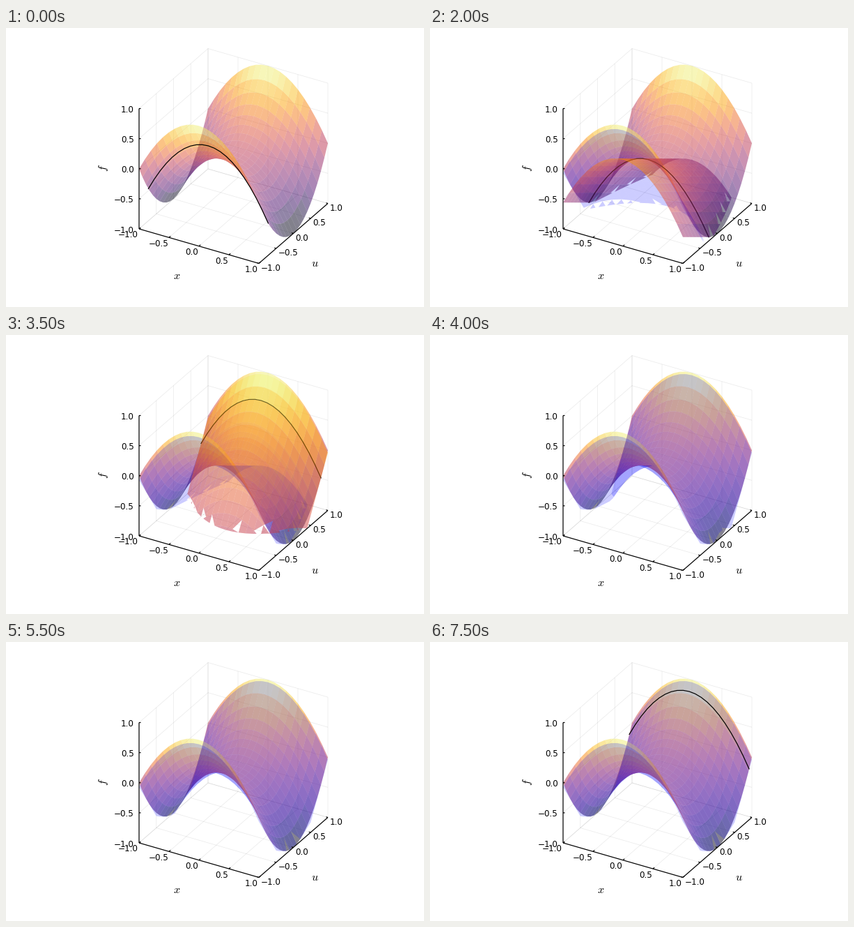
A matplotlib script that plays this animation: 600x400 px, repeating every 8000 ms.

```python
import numpy as np
import matplotlib.pyplot as plt
from matplotlib.animation import FuncAnimation
from matplotlib.collections import LineCollection, PolyCollection

W, H, DPI = 600, 400, 100
STEP_MS = 500
STEPS = 16
TRIALS = [-0.73, -0.25, 0.8, 0.212, -0.093, 0.92]
TICKS = np.linspace(-1, 1, 5)
GRID = np.linspace(-1, 1, 21)
FLOOR = -1.0

plt.rcParams["font.family"] = "DejaVu Sans"
plt.rcParams["mathtext.fontset"] = "cm"


def px(points):
    """World (x, u, f) to stage pixels, orthographic view."""
    x, u, f = (np.asarray(points, float) + 1).T
    return np.column_stack([191 + 86 * x + 49.5 * u,
                            288 + 24.75 * x - 43 * u - 86.25 * f])


def pt(size):
    return size * 72 / DPI


def saddle(x, u):
    return u**2 - x**2


def tangent(u0):
    return lambda x, u: 2 * u0 * u - u0**2 - x**2


def lower_bound(cuts):
    return lambda x, u: np.max([tangent(c)(x, u) for c in cuts], axis=0)


def clip_floor(quad):
    """Cut a cell at the floor; a single low corner is simply dropped."""
    inside = quad[:, 2] >= FLOOR
    if inside.sum() >= 3:
        return quad[inside]
    out = []
    for a, b in zip(quad, np.roll(quad, -1, axis=0)):
        if a[2] >= FLOOR:
            out.append(a)
        if (a[2] >= FLOOR) != (b[2] >= FLOOR):
            out.append(a + (b - a) * (FLOOR - a[2]) / (b[2] - a[2]))
    return out


def mesh(func):
    """Cell polygons, far to near, with their mean heights and the lowest point."""
    x, u = np.meshgrid(GRID, GRID, indexing="ij")
    p = np.stack([x, u, func(x, u)], axis=-1)
    quads = np.stack([p[:-1, :-1], p[:-1, 1:], p[1:, 1:], p[1:, :-1]], axis=2)
    quads = quads.reshape(-1, 4, 3)
    depth = quads.mean(axis=1) @ np.array([-0.433, 0.75, -0.5])
    polys, heights = [], []
    for quad in quads[np.argsort(-depth)]:
        part = clip_floor(quad)
        if len(part) > 2:
            polys.append(px(part))
            heights.append(quad[:, 2].mean())
    return polys, np.array(heights), p[..., 2].min()


def shade(heights, low):
    return plt.cm.inferno(np.clip((heights - low) / (1 - low), 0, 1), alpha=0.5)


fig = plt.figure(figsize=(W / DPI, H / DPI), dpi=DPI, facecolor="white")
ax = fig.add_axes([0, 0, 1, 1])
ax.set_xlim(0, W)
ax.set_ylim(H, 0)
ax.axis("off")


def add_lines(segments, color, width, zorder):
    ax.add_collection(LineCollection(segments, colors=color, linewidths=pt(width),
                                     snap=False, zorder=zorder))


def draw_axes():
    grid = []
    for t in TICKS:
        grid += [[(t, -1, -1), (t, 1, -1)], [(t, 1, -1), (t, 1, 1)],
                 [(-1, t, -1), (1, t, -1)], [(-1, t, -1), (-1, t, 1)],
                 [(-1, -1, t), (-1, 1, t)], [(-1, 1, t), (1, 1, t)]]
    add_lines([px(s) for s in grid], (0, 0, 0, 0.08), 0.8, 1)

    spines = [px(s) for s in ([(-1, -1, -1), (-1, -1, 1)],
                              [(-1, -1, -1), (1, -1, -1)],
                              [(1, -1, -1), (1, 1, -1)])]
    font = dict(fontsize=pt(12), va="center_baseline", zorder=6)
    for t in TICKS:
        label = f"{t:.1f}".replace("-", "\u2212")
        marks = [((-1, -1, t), (2.5, 0), (-7, 0.5), "right"),
                 ((t, -1, -1), (2.2, -1.9), (-1, 7.5), "right"),
                 ((1, t, -1), (-2.5, -0.7), (3, 5.3), "left")]
        for pos, tick, shift, align in marks:
            at = px([pos])[0]
            spines.append([at, at + tick])
            ax.text(*(at + shift), label, ha=align, **font)
    add_lines(spines, "black", 1.2, 5)

    for x, y, name, turn in [(245, 355, "x", 0), (443, 337, "u", 0), (140, 201, "f", 90)]:
        ax.text(x, y, f"${name}$", fontsize=pt(16), rotation=turn,
                ha="center", va="center", zorder=6)


def add_surface(zorder):
    return ax.add_collection(PolyCollection([], linewidths=0, edgecolors="none",
                                            antialiaseds=True, zorder=zorder))


draw_axes()
base, bound, cut = (add_surface(z) for z in (2, 3, 4))
polys, *levels = mesh(saddle)
base.set_verts(polys)
base.set_facecolor(shade(*levels))
bound.set_facecolor((0, 0, 1, 0.2))
curve, = ax.plot([], [], color="black", lw=pt(1.2), zorder=3.5)


def update(step):
    # Each trial: show its curve, then its tangent, then merge it into the bound.
    n, phase = divmod(step, 3)
    u0 = TRIALS[n]
    cuts = TRIALS[:n + (phase == 2)]

    bound.set_verts(mesh(lower_bound(cuts))[0] if cuts else [])

    if phase == 1:
        polys, *levels = mesh(tangent(u0))
        cut.set_verts(polys)
        cut.set_facecolor(shade(*levels))
    else:
        cut.set_verts([])

    line = px(np.column_stack([GRID, np.full_like(GRID, u0), saddle(GRID, u0)]))
    curve.set_data(line[:, 0], line[:, 1])
    curve.set_visible(phase < 2)
    return bound, cut, curve


anim = FuncAnimation(fig, update, frames=STEPS, interval=STEP_MS,
                     repeat=True, repeat_delay=0)
plt.show()
```
